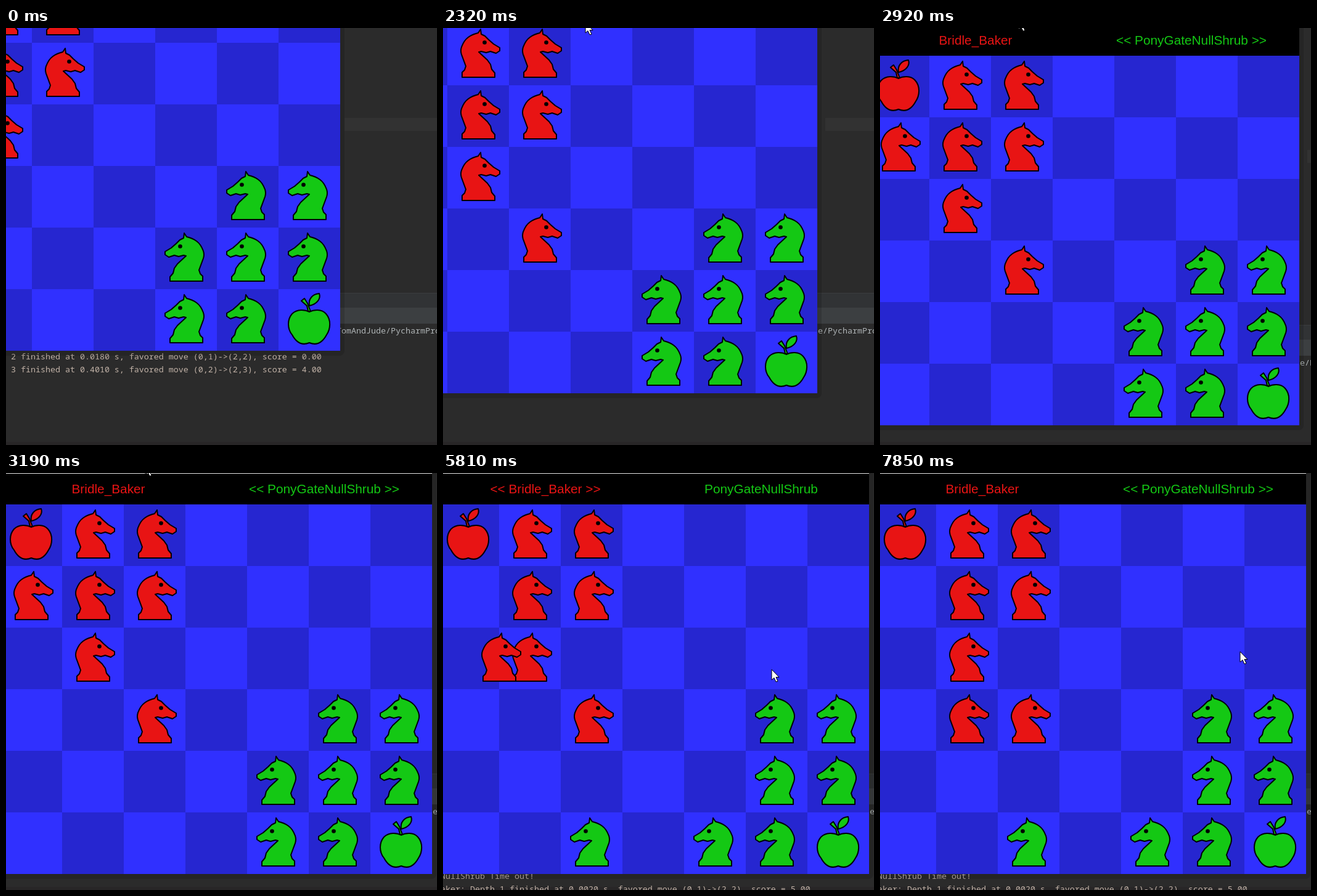
Recreate the animation shown at these times as an HTML page with a canvas. Size 699 by 677 pixels, loop 8 s.

```html
<!DOCTYPE html>
<html lang="en">
<head>
<meta charset="utf-8">
<title>Knight board game</title>
<style>
html, body { margin: 0; width: 100%; height: 100%; overflow: hidden; background: #2b2b2b; }
canvas { display: block; }
</style>
</head>
<body>
<canvas id="stage" width="699" height="677"></canvas>
<script>
const ctx = document.getElementById('stage').getContext('2d');
const LOOP = 8000, CELL = 100, COLS = 7, ROWS = 6;
const TICK = 120, DRAG_TIME = 1360, MOVE_TIME = 240;
const RED = '#e81414', GREEN = '#14c814';
const RED_NAME = 'Bridle_Baker', GREEN_NAME = 'PonyGateNullShrub';

// Shapes are drawn inside a 100 x 100 cell.
const horse = new Path2D(`M47 9 L51 15 Q60 17 67 22 T78 38 Q80 44 78 50 L71 69 L73 75 L77 79
  V87 H24 V80 L29 74 L31 66 L36 59 L50 46 L46 45 L38 47 L31 45 L22 48 L16 44 V39
  L26 33 L34 26 L40 20 L46 17 Z`);
const appleBody = new Path2D(`M50 37 C57 33 70 32 77 40 C86 50 84 65 78 74 C71 87 62 92 50 87
  C38 92 29 87 22 74 C14 64 14 49 22 40 C30 32 43 33 50 37 Z`);
const stem = new Path2D('M48 36 L46 27 L37 19 L42 15 L47 23 L52 36 Z');
const leaf = new Path2D('M50 27 C48 16 55 8 66 7 C69 15 63 24 50 27 Z');
const arrow = new Path2D('M0 0 V17 L4 13.5 L7 20 L10 19 L7 12.5 H12 Z');

// Each side fills its corner; green is red turned half a circle.
const pieces = [];
for (let y = 0; y < 3; y++)
  for (let x = 0; x < 3; x++)
    if (x + y > 0 && x + y < 4)
      pieces.push({ x, y, color: RED }, { x: COLS - 1 - x, y: ROWS - 1 - y, color: GREEN });

const moves = [
  { start: 1343, from: [0, 2], to: [2, 3] },
  { start: 3560, from: [4, 4], to: [2, 5] },
  { start: 5680, from: [0, 1], to: [1, 3] },
];

// Key points: [time, x, y]
const panKeys = [[2560, 0, 0], [2680, 31, 17], [2920, 73, 52], [3160, 84, 58]];
const cursorKeys = [
  [2080, 231, -40], [2200, 231, -8], [2680, 229, -11], [2920, 225, -15], [4000, 228, -15],
  [4120, 255, 129], [4240, 282, 129], [4500, 230, 60], [4720, 239, 93], [5110, 356, 248],
  [5260, 456, 300], [5540, 518, 296], [5800, 533, 319], [6080, 575, 337], [6320, 605, 317],
  [6560, 562, 300], [7080, 543, 297], [7320, 543, 296], [7600, 576, 293], [7840, 584, 290],
];

const clamp = v => Math.min(1, Math.max(0, v));
const lerp = (a, b, p) => a + (b - a) * p;

function positionAt(keys, t) {
  const i = keys.findIndex(key => key[0] > t);
  const [t1, x1, y1] = keys.at(i);
  if (i < 1) return [x1, y1];
  const [t0, x0, y0] = keys[i - 1];
  const p = (t - t0) / (t1 - t0);
  return [Math.round(lerp(x0, x1, p)), Math.round(lerp(y0, y1, p))];
}

function rect(color, x, y, w, h) {
  ctx.fillStyle = color;
  ctx.fillRect(x, y, w, h);
}

function text(string, x, y, color, font, align = 'left') {
  ctx.font = font;
  ctx.fillStyle = color;
  ctx.textAlign = align;
  ctx.fillText(string, x, y);
}

function shape(path, fill, width = 2) {
  ctx.fillStyle = fill;
  ctx.fill(path);
  ctx.lineWidth = width;
  ctx.stroke(path);
}

function drawAt(x, y, paint) {
  ctx.save();
  ctx.translate(x, y);
  paint();
  ctx.restore();
}

function drawHorse({ x, y, color }) {
  drawAt(x * CELL, y * CELL, () => {
    if (color === RED) ctx.transform(-1, 0, 0, 1, 101, 0);
    shape(horse, color);
    ctx.beginPath();
    ctx.arc(40.5, 30.5, 3.3, 0, 7);
    ctx.fillStyle = '#000';
    ctx.fill();
  });
}

function drawApple(x, y, color) {
  drawAt(x * CELL, y * CELL, () => [appleBody, leaf, stem].forEach(path => shape(path, color)));
}

function drawEditor(t) {
  const mono = '13.33px "Noto Sans Mono", "DejaVu Sans Mono", monospace';
  const log = (line, y) => text(line, -152, y, '#c0b1a6', mono);
  const depth = (n, time, move, score) =>
    `${RED_NAME}: Depth ${n} finished at ${time} s, favored move ${move}, score = ${score}`;
  rect('#323232', t < DRAG_TIME ? 549 : 620, 146, 200, 21);
  rect('#313335', 0, 430, 699, 24);
  rect('#3a3c3e', 0, 430, 699, 1);
  rect('#3c3f41', 0, 454, 699, 26);
  text('TomAndJude/PycharmProjects', 536, 496, '#afb4b6', mono);
  log(depth(2, '0.0180', '(0,1)->(2,2)', '0.00'), 538);
  log(depth(3, '0.4010', '(0,2)->(2,3)', '4.00'), 559);
  if (t >= 3620) log(`${GREEN_NAME} Time out!`, 601);
  if (t >= 4020) log(depth(1, '0.0020', '(0,1)->(2,2)', '5.00'), 622);
}

function drawTitles(tick) {
  const finished = moves.filter(move => tick > move.start + MOVE_TIME).length;
  const turn = finished % 2 ? GREEN : RED;
  const title = (name, color, x) => text(turn === color ? `<< ${name} >>` : name, x, -18, color,
    '20.8px "Liberation Sans", Arial, sans-serif', 'center');
  title(RED_NAME, RED, 175);
  title(GREEN_NAME, GREEN, 525);
}

function drawBoard(tick) {
  ctx.fillStyle = 'rgba(0,0,0,.14)';
  ctx.beginPath();
  ctx.roundRect(0, -80, 707, 688, 8);
  ctx.fill();
  rect('#e8e8e8', 0, -80, 700, 30);
  rect('#000', 0, -50, 700, 50);
  drawTitles(tick);
  for (let y = 0; y < ROWS; y++)
    for (let x = 0; x < COLS; x++)
      rect((x + y) % 2 ? '#3030ff' : '#2626d0', x * CELL, y * CELL, CELL, CELL);

  drawApple(0, 0, RED);
  drawApple(COLS - 1, ROWS - 1, GREEN);
  const moved = [];
  for (const piece of pieces) {
    const move = moves.find(({ from }) => from[0] === piece.x && from[1] === piece.y);
    if (!move) { drawHorse(piece); continue; }
    const p = clamp((tick - move.start) / MOVE_TIME);
    const [x, y] = move.from.map((a, i) => lerp(a, move.to[i], p));
    moved.push({ x, y, color: piece.color });
  }
  moved.forEach(drawHorse);
}

function frame(now) {
  const t = now % LOOP;
  const phase = DRAG_TIME % TICK;
  const tick = Math.floor((t - phase) / TICK) * TICK + phase;
  const [panX, panY] = positionAt(panKeys, tick);
  const [winX, winY] = t < DRAG_TIME ? [-158, -76] : [-93, -7];
  rect('#2b2b2b', 0, 0, 699, 677);
  rect('#282627', 0, 672, 699, 5);
  ctx.strokeStyle = '#000';
  ctx.lineJoin = 'round';
  drawAt(panX, panY, () => drawEditor(t));
  drawAt(winX + panX, winY + panY, () => drawBoard(tick));
  drawAt(...positionAt(cursorKeys, tick), () => shape(arrow, '#fff', 1));
  requestAnimationFrame(frame);
}
requestAnimationFrame(frame);
</script>
</body>
</html>
```
